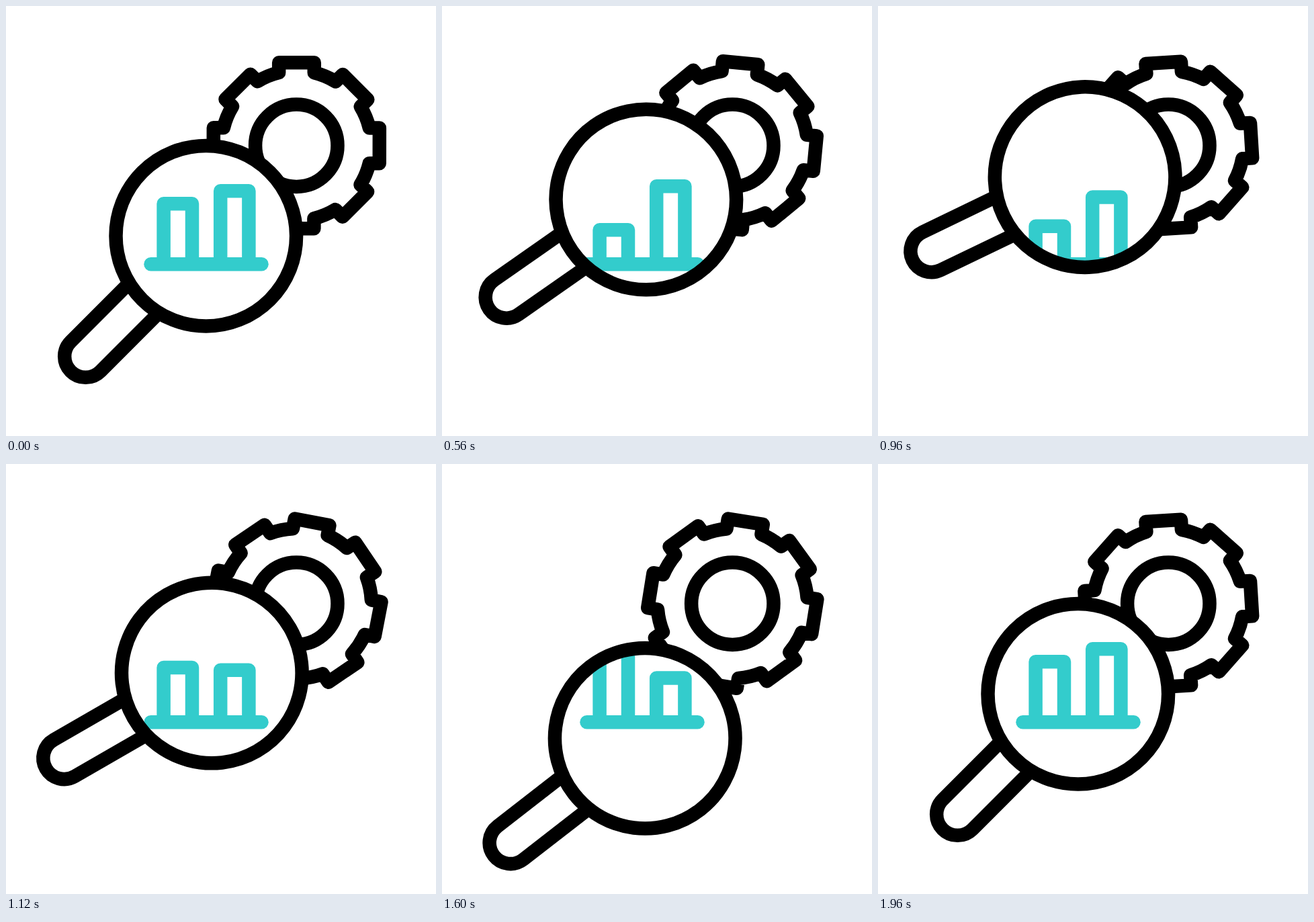
These frames come from a looping animation (640x640 px, 2 s). An HTML page:

```html
<!DOCTYPE html>
<html lang="en">
<head>
<meta charset="utf-8">
<title>Analysis icon</title>
<style>
  html, body { margin: 0; width: 100%; height: 100%; overflow: hidden; background: #fff; }
  svg { display: block; width: 100%; height: 100%; }

  .line {
    fill: none; stroke: #000; stroke-width: 20.5;
    stroke-linecap: round; stroke-linejoin: round;
  }
  .chart { stroke: #3cc; }
  .white { fill: #fff; }

  .gear, .glass, .bar {
    animation: 2s infinite cubic-bezier(.333, 0, .667, 1);
  }
  .gear { animation-name: spin; animation-timing-function: linear; transform-origin: 432.3px 207.7px; }
  .glass { animation-name: bob, tilt; transform-origin: 259.5px 380px; }
  .first { animation-name: first; }
  .second { animation-name: second; }

  @keyframes spin { to { rotate: 180deg; } }

  @keyframes bob {
    0% { translate: 0 0; animation-timing-function: cubic-bezier(.53, 0, .66, 1); }
    46% { translate: 0 -108px; animation-timing-function: cubic-bezier(.21, 0, .77, 1); }
    72.5% { translate: 0 76.6px; }
    98.5%, 100% { translate: 0 0; }
  }
  @keyframes tilt {
    0% { rotate: 0deg; animation-timing-function: cubic-bezier(.62, 0, .67, 1); }
    46% { rotate: 20deg; animation-timing-function: cubic-bezier(.08, 0, .7, 1); }
    72.5% { rotate: 9deg; }
    98.5%, 100% { rotate: 0deg; }
  }
  @keyframes first {
    0% { translate: 0 0; animation-timing-function: cubic-bezier(.38, 0, .667, 1); }
    38.5% { translate: 0 48px; }
    71% { translate: 0 -22px; }
    98.5%, 100% { translate: 0 0; }
  }
  @keyframes second {
    0% { translate: 0 0; }
    36.5% { translate: 0 -8px; }
    71% { translate: 0 58px; }
    98.5%, 100% { translate: 0 0; }
  }
</style>
</head>
<body>
<svg viewBox="0 0 640 640">
  <defs>
    <clipPath id="view"><circle class="glass" cx="297.8" cy="342.2" r="130"/></clipPath>
    <clipPath id="floor"><rect width="640" height="384"/></clipPath>
  </defs>

  <g class="gear">
    <path id="rim" class="line" transform="translate(432.3 207.7)"/>
  </g>
  <circle class="line" cx="432.3" cy="207.7" r="61.2"/>

  <g class="glass">
    <path class="line white" transform="translate(297.8 342.2) rotate(135)"
          d="M129-31.3H253.6a31.3 31.3 0 0 1 0 62.6H129"/>
    <circle class="white" cx="297.8" cy="342.2" r="134.3"/>
  </g>

  <g clip-path="url(#view)">
    <g clip-path="url(#floor)">
      <path class="line chart bar first" d="M234.6 470V294.3H277V470"/>
      <path class="line chart bar second" d="M319.2 470V275.2H361.4V470"/>
    </g>
    <path class="line chart" d="M215.5 384.3H380.5"/>
  </g>

  <circle class="line glass" cx="297.8" cy="342.2" r="134.3"/>
</svg>
<script>
  // One tooth, repeated eight times; root arcs join neighbouring teeth.
  const TEETH = 8, HALF = 26.3, TIP = -123.5, ROOT = -108.5;
  const radius = Math.hypot(HALF, ROOT);

  function turn([x, y], angle) {
    const c = Math.cos(angle), s = Math.sin(angle);
    return (x * c - y * s).toFixed(2) + ' ' + (x * s + y * c).toFixed(2);
  }

  let d = '';
  for (let i = 0; i < TEETH; i++) {
    const at = (x, y) => turn([x, y], i * 2 * Math.PI / TEETH);
    d += i ? `A${radius} ${radius} 0 0 1 ` : 'M';
    d += `${at(-HALF, ROOT)}L${at(-HALF, TIP)}L${at(HALF, TIP)}L${at(HALF, ROOT)}`;
  }
  d += `A${radius} ${radius} 0 0 1 ${turn([-HALF, ROOT], 0)}Z`;
  document.getElementById('rim').setAttribute('d', d);
</script>
</body>
</html>
```
